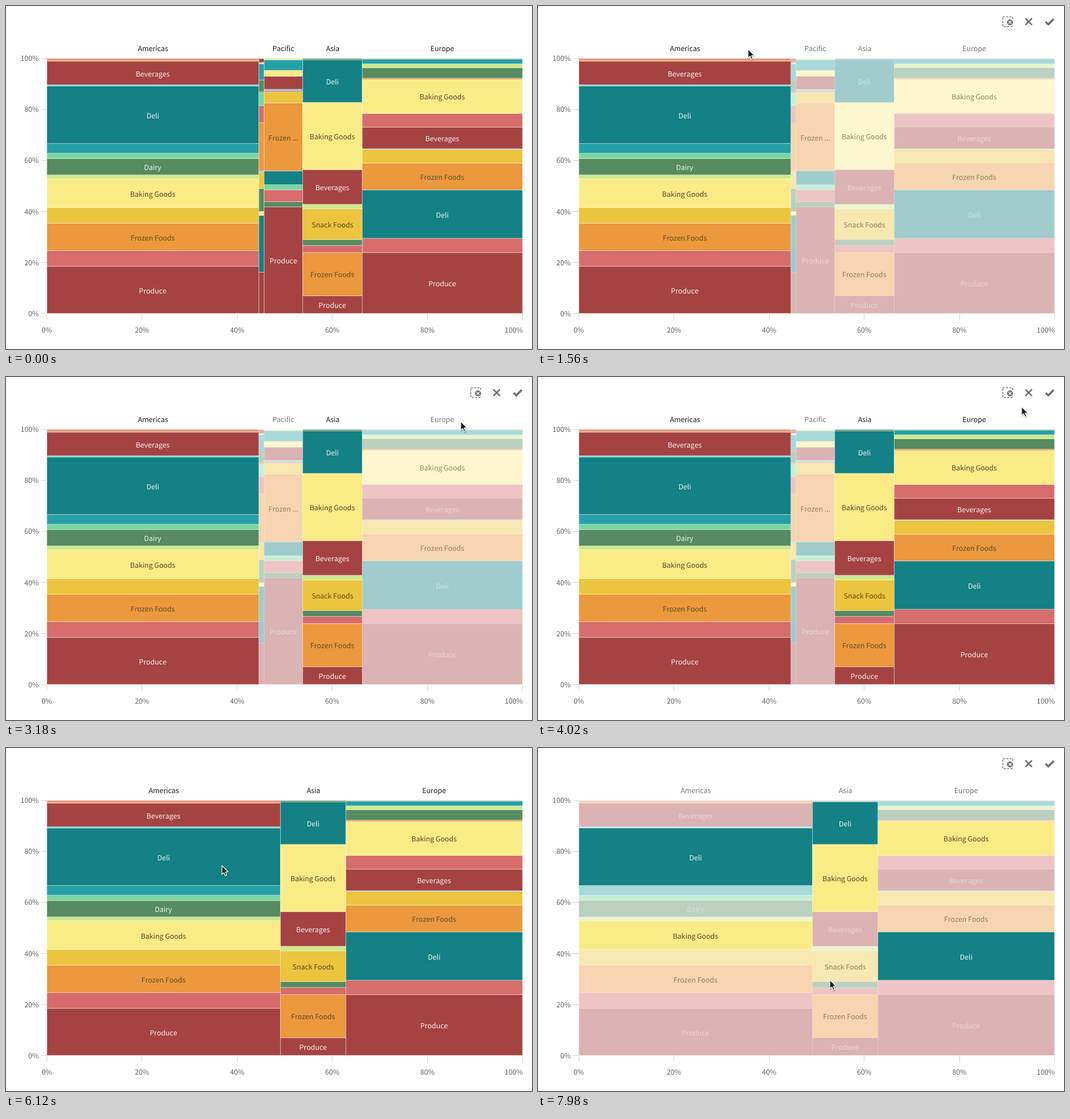
Recreate the animation shown at these times as a matplotlib script. Size 804 by 525 pixels, loop 8000 ms.

```python
import math

import numpy as np
import matplotlib.pyplot as plt
from matplotlib.animation import FuncAnimation
from matplotlib.collections import PolyCollection
from matplotlib.colors import to_rgba
from matplotlib.patches import Circle, PathPatch, Polygon, Rectangle
from matplotlib.textpath import TextPath
from matplotlib.transforms import Affine2D

W, H, DPI = 804, 525, 96
PX = 72 / DPI
FRAMES, STEP = 200, 40
LEFT, RIGHT, TOP, BOTTOM = 62.4, 789.6, 80.2, 470.8
TEXT_SIZE = 10.74

plt.rcParams.update({
    "font.family": "Noto Sans CJK JP",
    "path.snap": False,
    "toolbar": "None",
})

# One letter per product group
COLORS = {
    "P": "#a54343", "B": "#a54343", "p": "#d76c6c", "F": "#ec983d",
    "S": "#ecc43d", "G": "#f9ec86", "l": "#cbe989", "Y": "#578b60",
    "m": "#79d69f", "t": "#26a0a7", "D": "#138185", "c": "#65d3da",
}
NAMES = {
    "P": "Produce", "B": "Beverages", "F": "Frozen Foods", "S": "Snack Foods",
    "G": "Baking Goods", "Y": "Dairy", "D": "Deli",
}
INK = {"G": "#4f3626", "F": "#54461f", "S": "#4f3d1c"}

# Region: width in percent, groups from the bottom up (' marks a sliver),
# main groups in percent; the others share what is left by WEIGHT.
WEIGHT = dict(p=24, S=24, Y=17, t=15, m=8, l=6, c=2)
SLIVER = 2
REGIONS = {
    "Americas": (44.6, "PpFSGlYmtDcBF'p'",
                 dict(P=18.5, F=10.7, G=11.3, Y=6.5, D=22.3, B=9.4)),
    "": (1.1, "PDGYScFpmp'YtG'B",
         dict(P=16.2, D=22.3, G=1.4, Y=9, F=19, m=4.9, t=6.4, B=1.6)),
    "Pacific": (8.1, "PYpmDFSp'cBGtl'",
                dict(P=41.8, F=26.7, D=5.2, B=5.2, G=2.2, Y=2.1, p=4.5,
                     S=4.3)),
    "Asia": (12.5, "PFpYSlBGDY'",
             dict(P=7, F=17, p=2.8, Y=2.2, S=12, B=13.7, G=26.3, D=16.6)),
    "Europe": (33.7, "PpDFScBpGF'YltY'",
               dict(P=24, D=19, F=10.5, B=8.3, G=13.3, S=5.2, Y=4.2, t=1.7)),
}

# Pointer stops: click time, place, thing clicked
START = (12, 400)
STOPS = [
    (1500, (321, 66), "Americas"),
    (2640, (531, 68), "Asia"),
    (3360, (695, 68), "Europe"),
    (4590, (779, 25), "confirm"),
    (6240, (330, 180), "D"),
    (6960, (334.4, 278), "G"),
    (8100, (446, 355), None),
]
REST, TRAVEL = 300, 600
ARROW = np.array([(0, 0), (0, 13.6), (3.1, 10.8), (5.2, 15.7),
                  (7.5, 14.7), (5.4, 9.9), (9.6, 9.6)])

fig = plt.figure(figsize=(W / DPI, H / DPI), dpi=DPI, facecolor="white")
ax = fig.add_axes([0, 0, 1, 1])
ax.set_xlim(0, W)
ax.set_ylim(H, 0)
ax.axis("off")


def crisp(v):
    """Middle of the pixel that holds v."""
    return math.floor(v) + 0.5


def label(x, mid, text, color, align=0.5):
    """Outlined text whose capitals are centred on the height mid."""
    path = TextPath((0, 0), text, size=TEXT_SIZE)
    box = path.get_extents()
    shift = x - box.x0 - align * box.width
    flip = Affine2D().scale(1, -1).translate(shift, round(mid) + 4)
    return ax.add_patch(PathPatch(path.transformed(flip), fc=color,
                                  ec="none", lw=0, zorder=3))


def line(xs, ys, color, width, **kw):
    return ax.plot(xs, ys, color=color, lw=width * PX, **kw)[0]


def draw_axes():
    for i in range(6):
        y = BOTTOM + (TOP - BOTTOM) * i / 5
        x = LEFT + (RIGHT - LEFT) * i / 5
        line([54, 62], [crisp(y)] * 2, "#d9d9d9", 1)
        line([crisp(x)] * 2, [471, 480], "#d9d9d9", 1)
        label(49.5, y, f"{20 * i}%", "#606060", 1)
        label(x, 496, f"{20 * i}%", "#606060", 1 if i == 5 else 0.5)


def stack(order, main):
    """Groups of one column with their share of its height."""
    main, parts = dict(main), []
    for g, mark in zip(order, order[1:] + " "):
        if g == "'":
            continue
        if mark == "'":
            parts.append((g, SLIVER, False))
        elif g in main:
            parts.append((g, main.pop(g) / 100, True))
        else:
            parts.append((g, WEIGHT[g], False))
    rest = 1 - sum(size for _, size, fixed in parts if fixed)
    total = sum(size for _, size, fixed in parts if not fixed)
    return [(g, size if fixed else size * rest / total)
            for g, size, fixed in parts]


class Layout:
    """A set of regions side by side, coloured by the selection."""

    def __init__(self, names):
        self.blocks, self.labels, self.heads = [], [], []
        polys = []
        total = sum(REGIONS[n][0] for n in names)
        left = LEFT
        for name in names:
            width, order, main = REGIONS[name]
            right = left + (RIGHT - LEFT) * width / total
            x0, x1, mid = crisp(left), crisp(right), (left + right) / 2
            if name:
                self.heads.append((label(mid, 65, name, "black"), name))
            low = BOTTOM
            for group, share in stack(order, main):
                high = low - (BOTTOM - TOP) * share
                y0, y1 = crisp(low), crisp(high + 1e-6)
                polys.append([(x0, y0), (x1, y0), (x1, y1), (x0, y1)])
                self.blocks.append((name, group))
                if low - high > 25 and x1 - x0 > 20 and group in NAMES:
                    text = NAMES[group]
                    if x1 - x0 < 70 and len(text) > 9:
                        text = text.split()[0] + " ..."
                    art = label(mid, (low + high) / 2 + 1.2, text, "white")
                    self.labels.append((art, name, group))
                low = high
            left = right
        self.rects = PolyCollection(polys, linewidths=PX, zorder=1)
        ax.add_collection(self.rects)

    def show(self, visible, picked):
        self.rects.set_visible(visible)
        for art, *_ in self.labels + self.heads:
            art.set_visible(visible)
        if not visible:
            return

        def lit(name, group):
            return not picked or name in picked or group in picked

        level = [1 if lit(*b) else 0.4 for b in self.blocks]
        self.rects.set_facecolor(
            [to_rgba(COLORS[g], a) for (_, g), a in zip(self.blocks, level)])
        self.rects.set_edgecolor([(1, 1, 1, 0.32 * a) for a in level])
        for art, name, group in self.labels:
            dim = 0.6 if group in INK else 0.45
            alpha = 0.92 if lit(name, group) else dim
            art.set_facecolor(to_rgba(INK.get(group, "white"), alpha))
        for art, name in self.heads:
            art.set_facecolor("#1a1a1a" if lit(name, None) else "#737373")


def make_toolbar():
    grey = "#6e6e6e"
    frame = Rectangle((710.5, 16.5), 15, 15, fill=False, ec=grey,
                      lw=1.2 * PX, ls=(0, (2.6, 1.6)), zorder=4)
    halo = Circle((721.5, 25), 5.8, fc="white", ec="none", zorder=5)
    disc = Circle((721.5, 25), 4.5, fc=grey, ec="none", zorder=6)
    parts = [ax.add_patch(p) for p in (frame, halo, disc)]
    for s in (1, -1):
        parts.append(line([719.8, 723.2], [25 - 1.7 * s, 25 + 1.7 * s],
                          "white", 1.2, zorder=7))
        parts.append(line([745, 755], [24 - 5 * s, 24 + 5 * s],
                          grey, 2.3, zorder=5, solid_capstyle="butt"))
    parts.append(line([776, 780, 788.3], [24.2, 28.2, 19.8], grey, 3.1,
                      zorder=5, solid_capstyle="butt",
                      solid_joinstyle="miter"))
    return parts


def pointer_at(t):
    """Pointer place, or None before it enters."""
    pos, free = None, 0
    here = np.array(START, float)
    for click, goal, _ in STOPS:
        end = click - REST
        begin = max(free, end - TRAVEL)
        if t < begin:
            break
        u = min((t - begin) / (end - begin), 1)
        pos = here + (np.array(goal) - here) * u * u * (3 - 2 * u)
        here, free = np.array(goal, float), click + 60
    return pos


def selection_at(t):
    """Shown layout and picked names after all clicks so far."""
    shown, picked = 0, []
    for click, _, thing in STOPS:
        if t < click:
            break
        if thing == "confirm":
            shown, picked = 1, []
        else:
            picked.append(thing)
    return shown, picked


draw_axes()
layouts = [Layout(list(REGIONS)), Layout(["Americas", "Asia", "Europe"])]
toolbar = make_toolbar()
hover = ax.add_patch(Rectangle((766, 8), 32, 32, fc="#e6e6e6", ec="none",
                               zorder=3))
shadow = ax.add_patch(Polygon(ARROW, fc="black", ec="black", lw=1.5 * PX,
                              alpha=0.2, zorder=9))
arrow = ax.add_patch(Polygon(ARROW, fc="#1c1c1c", ec="white", lw=1.1 * PX,
                             joinstyle="miter", zorder=10))


def update(n):
    t = n * STEP
    shown, picked = selection_at(t)
    for i, layout in enumerate(layouts):
        layout.show(i == shown, picked)
    for part in toolbar:
        part.set_visible(bool(picked))

    pos = pointer_at(t)
    inside = pos is not None
    hover.set_visible(inside and bool(picked) and pos[0] > 766 and pos[1] < 40)
    arrow.set_visible(inside)
    shadow.set_visible(inside)
    if inside:
        arrow.set_xy(ARROW + pos)
        shadow.set_xy(ARROW + pos + (0.5, 1.2))
    return []


anim = FuncAnimation(fig, update, frames=FRAMES, interval=STEP,
                     init_func=lambda: update(0), repeat=True,
                     repeat_delay=0, blit=False, cache_frame_data=False)
plt.show()
```
